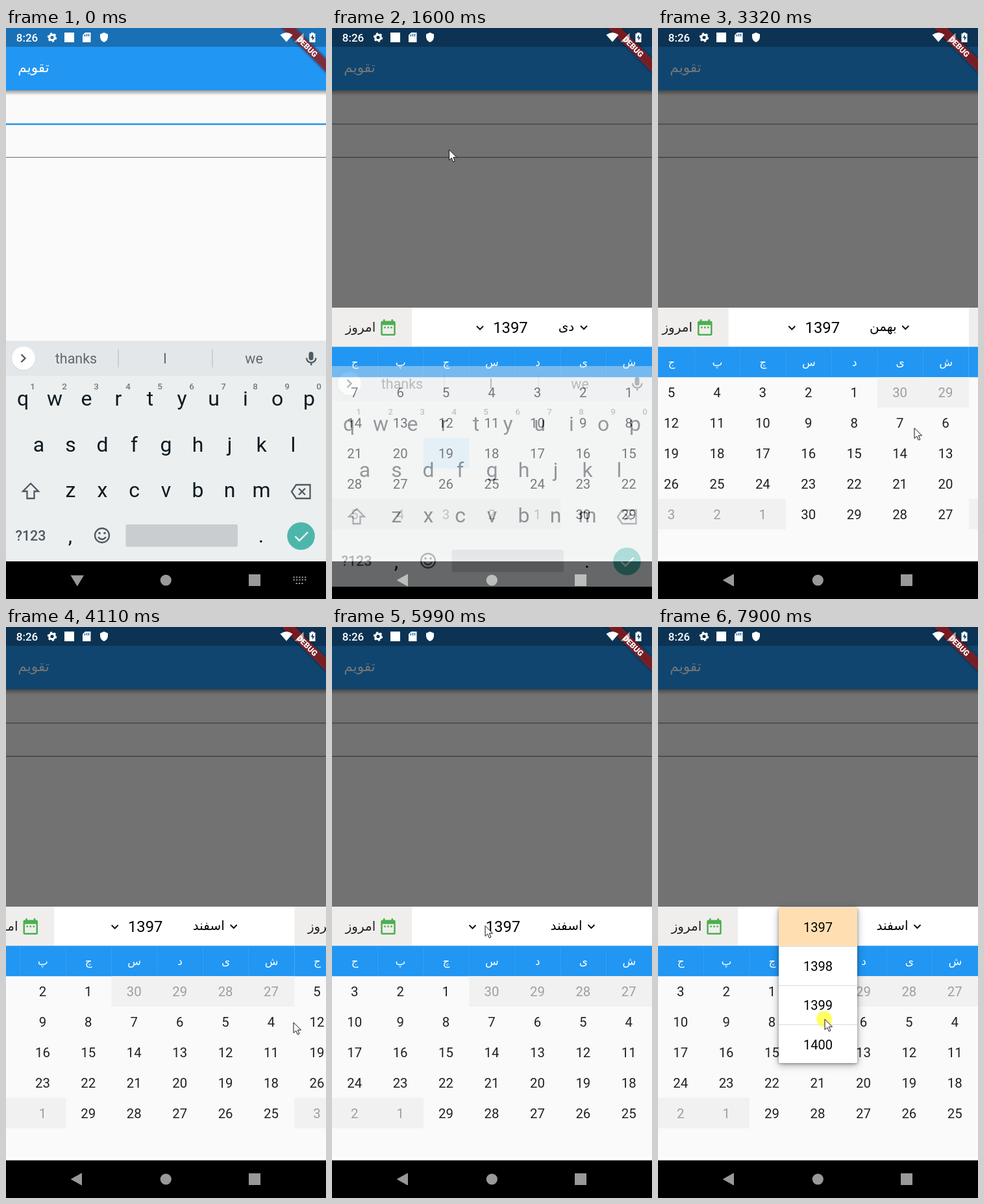
Animation of 493 by 880 pixels, one loop 7.99 s. Source, as an HTML page:

```html
<!DOCTYPE html>
<html lang="fa">
<head>
<meta charset="utf-8">
<title>تقویم</title>
<style>
  html, body { margin: 0; width: 100%; height: 100%; overflow: hidden; background: #000; }
  svg { display: block; width: 100%; height: 100%; }
  text { font-family: Roboto, "Noto Sans", "DejaVu Sans", sans-serif; text-anchor: middle; white-space: pre; }
  .line { fill: none; }
  .key { font-size: 32px; fill: #0c1a21; }
  .hint { font-size: 13.5px; font-weight: 500; fill: #717b7f; }
  .word { font-size: 21.5px; fill: #5f696d; }
  .icon { fill: none; stroke: #4c5a61; stroke-width: 2.3; }
  .day { font-size: 20.4px; fill: #212121; }
  .out { fill: #9e9e9e; }
  .arrow { fill: none; stroke: #111; stroke-width: 2; }
  #menu { filter: drop-shadow(0 1px 2px rgba(0, 0, 0, .35)) drop-shadow(0 3px 6px rgba(0, 0, 0, .3)); }
</style>
</head>
<body>
<svg viewBox="0 0 493 880" preserveAspectRatio="none">
  <defs>
    <linearGradient id="shade" x2="0" y2="1">
      <stop stop-color="#000" stop-opacity=".38"/>
      <stop offset="1" stop-color="#000" stop-opacity="0"/>
    </linearGradient>
    <clipPath id="body"><rect width="493" height="822"/></clipPath>
  </defs>

  <rect width="493" height="880" fill="#fafafa"/>
  <rect y="96" width="493" height="8" fill="url(#shade)"/>
  <rect y="28" width="493" height="68" fill="#2196f3"/>
  <rect width="493" height="29" fill="#1a70b5"/>
  <text x="42.5" y="68" font-size="21.5" fill="#fff">تقويم</text>
  <rect id="focus" y="147" width="493" height="2.4" fill="#2491e4"/>
  <rect id="blur" y="147.5" width="493" height="1.2" fill="#868686"/>
  <rect y="198.8" width="493" height="1.2" fill="#7c7c7c"/>
  <rect id="dim" width="493" height="822"/>

  <g clip-path="url(#body)">
    <g id="sheet">
      <rect y="431" width="493" height="391" fill="#fafafa"/>
      <g id="pages"></g>
      <rect y="817" width="493" height="5" fill="#fff"/>
    </g>
  </g>

  <g id="menu">
    <rect id="menuBox" x="186" y="432" width="121" height="60" rx="2" fill="#fff"/>
    <rect x="186" y="432" width="121" height="60" rx="2" fill="#ffdfb2"/>
    <g id="years"></g>
  </g>

  <g transform="translate(493 0) rotate(45)">
    <rect x="-52" y="33.6" width="104" height="14.4" fill-opacity=".5" style="filter: blur(2px)"/>
    <rect x="-52" y="33.6" width="104" height="14.4" fill="#b71c1c" fill-opacity=".63"/>
  </g>
  <g fill="#fff">
    <text x="32.5" y="21" font-size="17" font-weight="500">8:26</text>
    <circle class="line" cx="71" cy="14.5" r="4.2" stroke="#fff" stroke-width="3.2"/>
    <circle class="line" cx="71" cy="14.5" r="6.1" stroke="#fff" stroke-width="2.2" pathLength="12" stroke-dasharray="1 1"/>
    <rect x="90" y="7" width="15" height="15"/>
    <path d="M122 7h8.500v15h-12.500v-11z"/>
    <path d="M121.500 10v3M124.500 9v4M127.500 9v4" stroke="#1a70b5" stroke-width="1.500"/>
    <path d="M151 7l6 2.500v4.500q0 5-6 8q-6-3-6-8v-4.500z"/>
    <path d="M432 21.500L422.500 10.500Q432 3.500 441.500 10.500Z"/>
    <path d="M458.500 7.500V21.500H444.500Z" fill-opacity=".6"/>
    <path d="M470 7h4v1.500h2.500v13.500h-9v-13.500h2.500z"/>
    <path d="M473 10l-3.500 5.500h2.500v4l3.500-5.500h-2.500z" fill="#174a70"/>
  </g>
  <text transform="translate(493 0) rotate(45)" y="45.2" font-size="12.2" font-weight="900" fill="#fff">DEBUG</text>

  <rect y="822" width="493" height="58"/>
  <g fill="#999">
    <path id="hide" d="M99.500 843.500h20.500l-10.200 17z"/>
    <path id="back" d="M100.500 851l16-9v18z" stroke="#999" stroke-linejoin="round"/>
    <circle cx="246.300" cy="851" r="8.600"/>
    <rect x="374" y="842" width="18" height="18"/>
    <path id="switch" class="line" stroke="#999" stroke-width="2.200" stroke-dasharray="2.300 2.100"
      d="M442.500 846.500h20M442.500 850.500h20M446.500 856h12"/>
  </g>

  <g id="keyboard">
    <rect y="482" width="493" height="340" fill="#eceff0"/>
    <rect y="482" width="493" height="54" fill="#e4e7e9"/>
    <circle cx="27" cy="509.5" r="18.5" fill="#000" fill-opacity=".1"/>
    <circle cx="27" cy="509" r="18" fill="#fff"/>
    <path class="icon" d="M23.500 503l6 6-6 6"/>
    <path d="M173 495v28M318 495v28" stroke="#c3c8ca" stroke-width="1.5"/>
    <rect x="466.5" y="499" width="7" height="13" rx="3.5" fill="#4c5a61"/>
    <path class="icon" d="M463 508.500a7.200 7.200 0 0 0 14.400 0M470.200 515v5"/>
    <g id="keys"></g>
    <path class="icon" d="M38 702L26 714H32.500V725H43.500V714H50Z"/>
    <path class="icon" d="M447 704H468.500V725H447L440 714.500ZM451 709.500l10 10M461 709.500l-10 10"/>
    <text x="38" y="790" font-size="21.5" font-weight="500" fill="#4c5a61">?123</text>
    <circle class="icon" cx="148" cy="782" r="11"/>
    <path class="icon" d="M142 784.500q6 7 12 0"/>
    <circle cx="144" cy="778.5" r="1.8" fill="#4c5a61"/>
    <circle cx="152" cy="778.5" r="1.8" fill="#4c5a61"/>
    <rect x="184.5" y="765" width="172.5" height="34.5" rx="3" fill="#c9cdd0"/>
    <circle cx="454.5" cy="783" r="21.3" fill="#4db6ac"/>
    <path class="line" d="M445.500 783.500l6.500 6.500 13-13" stroke="#fff" stroke-width="2.4"/>
  </g>

  <circle id="press" r="12" fill="#ff0" fill-opacity=".62"/>
  <path id="cursor" d="M1 .5v16l3.800-3.400l2.500 6l2.600-1.100l-2.500-5.900h5.100z" fill="#fff" stroke="#111"/>
</svg>
<script>
const LOOP = 7990, WIDTH = 493, COL = WIDTH / 7, ROW = 46.9;
const el = id => document.getElementById(id);
const text = (x, y, s, attrs) => `<text x="${x}" y="${y}" ${attrs}>${s}</text>`;
const rect = (x, y, w, h, fill) => `<rect x="${x}" y="${y}" width="${w}" height="${h}" fill="${fill}"/>`;
const range = n => [...Array(n).keys()];
const spread = (items, x, step, y, attrs) =>
  [...items].map((s, i) => text(x + step * i, y, s, attrs)).join('');

// Keyboard letters, hints and suggestions
el('keys').innerHTML =
  ['qwertyuiop', 'asdfghjkl', 'zxcvbnm'].map((letters, i) =>
    spread(letters, 26 + 24.5 * (i + (i > 1)), 49, 582 + 70.5 * i, 'class="key"')).join('') +
  spread(',.', 99, 294, 793, 'class="key"') +
  spread('1234567890', 41, 49, 557, 'class="hint"') +
  spread(['thanks', 'I', 'we'], 108, 137, 517, 'class="word"');

// Month pages; columns run right to left
const months = [
  { name: 'دی', lead: 0, days: 30, widen: 0, today: 19 },
  { name: 'بهمن', lead: 2, days: 30, widen: 7.5 },
  { name: 'اسفند', lead: 4, days: 29, widen: 11.5 },
];
const chevron = (x, y) => `<path class="arrow" d="M${x - 5} ${y - 2.5}l5 5 5-5"/>`;
const calendarIcon = `<path fill="#4caf50" transform="translate(71.5 446.5) scale(1.25)"
  d="M9 11H7v2h2zM13 11h-2v2h2zM17 11h-2v2h2zM19 4h-1V2h-2v2H8V2H6v2H5q-2 0-2 2v14q0 2 2 2h14q2 0 2-2V6q0-2-2-2zM19 20H5V9h14z"
  fill-rule="evenodd"/>`;

function dayCell(month, i) {
  const n = i - month.lead + 1;
  const label = n < 1 ? n + 30 : n > month.days ? n - month.days : n;
  const outside = label !== n;
  const x = (6 - i % 7) * COL, y = 538 + Math.floor(i / 7) * ROW;
  const fill = outside ? '#f1f1f1' : n === month.today ? '#def1fa' : '';
  return (fill && rect(x, y, COL + .2, ROW, fill)) +
    text(x + COL / 2 - .5, Math.round(y + 31), label, `class="day ${outside ? 'out' : ''}"`);
}

function page(month, index) {
  const d = month.widen;
  return `<g transform="translate(${-WIDTH * index} 0)">` +
    rect(0, 431, WIDTH, 60, '#fff') + rect(0, 431, 123, 60, '#f0eeec') +
    text(44, 467.5, 'امروز', 'font-size="20" fill="#222"') + calendarIcon +
    chevron(228 - d, 462) + text(275 - d, 470, '1397', 'font-size="23.8"') +
    text(361, 466.5, month.name, 'font-size="20"') + chevron(388 + d, 461.5) +
    rect(0, 491.3, WIDTH, 46.9, '#2196f3') +
    range(6).map(i => rect((i + 1) * COL - .5, 491.3, 1, 46.9, '#3a9fee')).join('') +
    spread('جپچسدیش', COL / 2, COL, 521, 'font-size="17" fill="#fff"') +
    range(35).map(i => dayCell(month, i)).join('') + '</g>';
}
el('pages').innerHTML = months.map(page).join('');

el('years').innerHTML = range(4).map(i => '<g>' +
  (i ? rect(186, 431.5 + 60.2 * i, 121, 1.2, '#dcdcdc') : '') +
  text(246.5, 470 + 60.2 * i, 1397 + i, 'font-size="20"') + '</g>').join('');

const clamp = v => Math.max(0, Math.min(1, v));
const smooth = u => u * u * (3 - 2 * u);

// Pointer glides; bow bends the path sideways
const glides = [
  { from: 70, to: 830, x: 162, y: 133 },
  { from: 1420, to: 2310, x: 118, y: 638, bow: 67 },
  { from: 2330, to: 2620, x: 143, y: 627 },
  { from: 2800, to: 3200, x: 394, y: 616 },
  { from: 3330, to: 3660, x: 200, y: 612 },
  { from: 3700, to: 3960, x: 442, y: 609 },
  { from: 4190, to: 4800, x: 68, y: 462 },
  { from: 5130, to: 5700, x: 235, y: 460 },
  { from: 7300, to: 7880, x: 256, y: 604 },
];
function pointer(t) {
  let x = 405, y = 862;
  for (const g of glides) {
    const e = smooth(clamp((t - g.from) / (g.to - g.from)));
    x += (g.x - x) * e + (g.bow || 0) * Math.sin(Math.PI * e);
    y += (g.y - y) * e;
  }
  return [x, y];
}

// A swipe follows the finger, then settles along a logistic curve
const swipes = [2849, 3720], taps = [1000, 5750, 7900], PRESS = 160;
const swiped = u => u < 0 ? 0 : 1 / (1 + Math.exp((254 - u) / 62));

const show = (id, on) => el(id).setAttribute('visibility', on ? 'visible' : 'hidden');
const fade = (node, v) => node.setAttribute('opacity', v);
const move = (id, x, y) => el(id).setAttribute('transform', `translate(${x} ${y})`);

function draw(t) {
  const open = t >= 1290, settled = t >= 1370;

  show('focus', !open);
  show('blur', open);
  show('hide', !open);
  show('switch', !open);
  show('back', open);
  show('sheet', open);
  fade(el('dim'), settled ? .54 : open ? .3 : 0);
  move('sheet', 0, settled ? 0 : 150);
  move('pages', WIDTH * swipes.reduce((sum, at) => sum + swiped(t - at), 0), 0);

  show('keyboard', t < 1680);
  move('keyboard', 0, settled ? 39 : 0);
  fade(el('keyboard'), settled ? .43 : 1);

  const grow = clamp((t - 6690) / 380), eased = 1 - (1 - grow) ** 2;
  show('menu', t >= 6690);
  fade(el('menu'), clamp(.35 + grow * 2));
  el('menuBox').setAttribute('height', 60 + 180 * eased);
  [...el('years').children].forEach((item, i) => fade(item, clamp(eased * 4 - i + 1)));

  const [x, y] = pointer(t);
  show('cursor', t >= 70);
  move('cursor', x, y);
  show('press', [...taps, ...swipes].some(at => t >= at && t < at + PRESS));
  move('press', x, y);
}

const start = performance.now();
function tick() {
  draw((performance.now() - start) % LOOP);
  requestAnimationFrame(tick);
}
tick();
</script>
</body>
</html>
```
